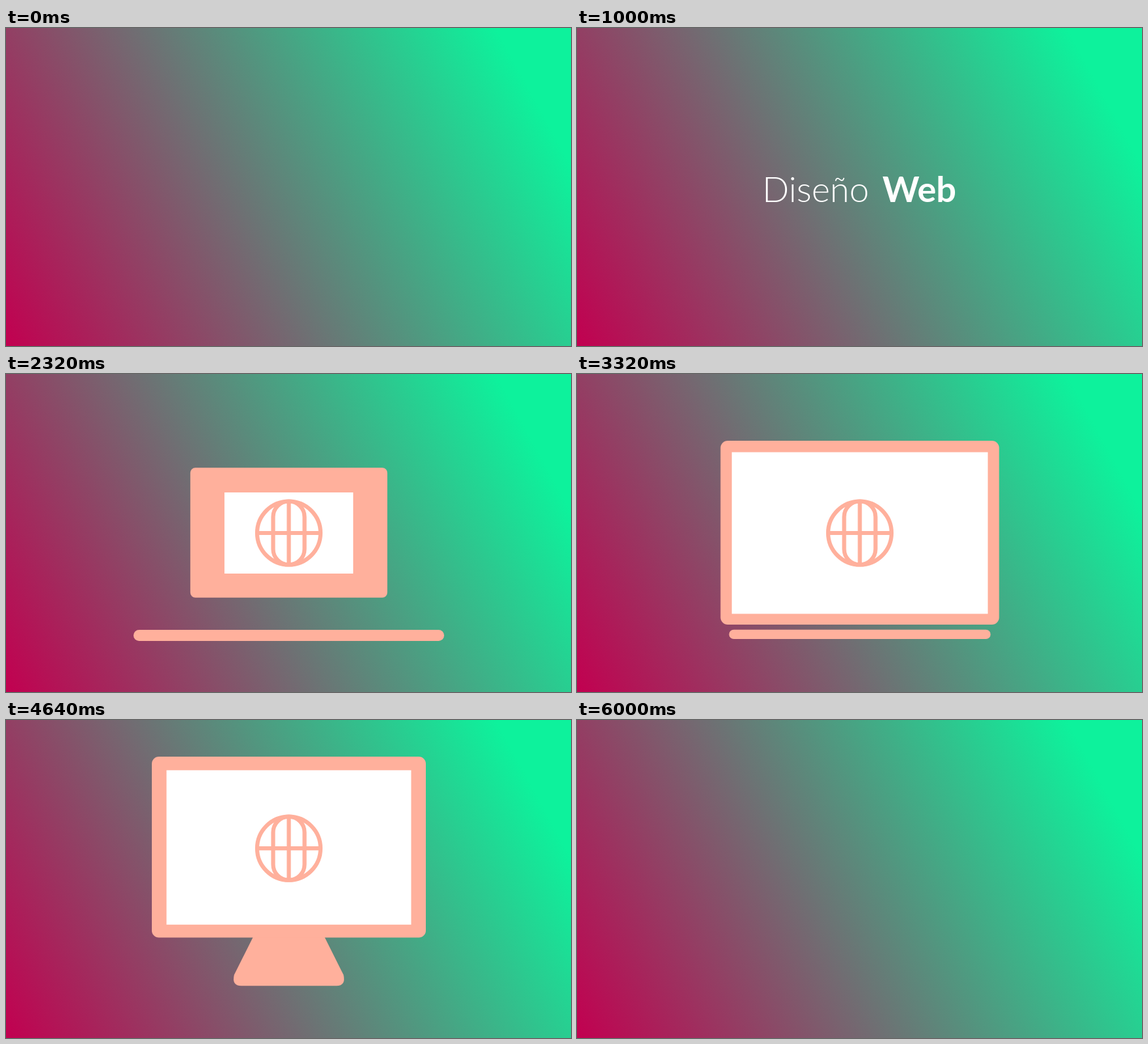
An HTML page with a canvas that plays this animation: 864x486 px, repeating every 6040 ms.

```html
<!DOCTYPE html>
<html lang="es">
<head>
<meta charset="utf-8">
<title>Diseño Web</title>
<style>
  html, body { margin: 0; width: 100%; height: 100%; overflow: hidden; }
  canvas { display: block; }
</style>
</head>
<body>
<canvas id="stage" width="864" height="486"></canvas>
<script>
const LOOP = 6040, PINK = '#ffb09c', CX = 432.5, CY = 243;
const ctx = document.getElementById('stage').getContext('2d');

const ramp = (t, a, b) => Math.min(1, Math.max(0, (t - a) / (b - a)));
const ease = (t, a, b) => { const u = ramp(t, a, b); return u * u * (3 - 2 * u); };

function gradient(x0, y0, x1, y1, from, to) {
  const g = ctx.createLinearGradient(x0, y0, x1, y1);
  g.addColorStop(0, from);
  g.addColorStop(1, to);
  return g;
}
const backdrop = gradient(0, 486, 782, 59, '#c20050', '#0df29c');
const textFill = gradient(0, 302, 0, 313, '#fff', 'rgba(255,255,255,0)');

// Globe strokes around the origin: path, length, draw-in end, erase end, cap
const globe = [
  ['M0-48.5A48.5 48.5 0 0 1 0 48.5A48.5 48.5 0 0 1 0-48.5', 97 * Math.PI, 1920, 5960, 'round'],
  ['M-48.5 0H48.5', 97, 1880, 5700, 'butt'],
  ['M0-48.5V48.5', 97, 1880, 5700, 'butt'],
  ['M0-48.5A24 24 0 0 0-24-24.5V24.5A24 24 0 0 0 0 48.5', 124.4, 1930, 5740, 'butt'],
  ['M0-48.5A24 24 0 0 1 24-24.5V24.5A24 24 0 0 1 0 48.5', 124.4, 1930, 5740, 'butt']
].map(([d, ...rest]) => [new Path2D(d), ...rest]);

const stand = new Path2D(
  'M-36 100H36L85 198Q89 215 74 215H-74Q-89 215-85 198Z');

function box(x, y, w, h, r, color) {
  if (w <= 0 || h <= 0) return;
  ctx.fillStyle = color;
  ctx.beginPath();
  ctx.roundRect(x - w / 2, y - h / 2, w, h, r);
  ctx.fill();
}

function word(text, x, weight, t, start) {
  const rise = 95 * (1 - ramp(t, start, start + 340)) ** 3;
  const sink = 95 * ramp(t, 940, 1280) ** 3;
  ctx.font = `${weight} 54px Raleway, Lato, sans-serif`;
  ctx.textAlign = 'center';
  ctx.fillStyle = textFill;
  ctx.fillText(text, x, 265 + rise + sink);
}

function drawBar(t) {
  const shrink = ease(t, 3160, 3800), s = 1 - shrink;
  const y = 399.5 + 95 * (1 - ease(t, 1880, 2280)) - 10 * shrink;
  box(CX, y, 475 * s, 17 * s, 8.5 * s, PINK);
}

function drawScreen(t, lift) {
  const s = ease(t, 2000, 2500) * (1 - ease(t, 4605, 5080));
  const inner = ease(t, 2040, 2600) * (1 - ease(t, 4577, 5080));
  const y = 242.5 - lift;
  if (t > 3600 && t < 5080) {
    ctx.save();
    ctx.translate(CX, y + 0.5);
    ctx.scale(s, s);
    ctx.translate(0, -76 * (1 - ease(t, 3600, 4280)));
    ctx.fillStyle = PINK;
    ctx.fill(stand);
    ctx.restore();
  }
  box(CX, y, 426 * s, 281 * s, 11 * s, PINK);
  box(CX, y + 0.5, 391.5 * inner, 247 * inner, 0, '#fff');
}

function drawGlobe(t, lift) {
  ctx.save();
  ctx.translate(CX, CY - lift);
  ctx.strokeStyle = PINK;
  ctx.lineWidth = 6.2;
  for (const [path, length, drawn, erased, cap] of globe) {
    const from = ramp(t, 5160, erased), to = ramp(t, 1320, drawn);
    if (to <= from) continue;
    ctx.lineCap = cap;
    ctx.setLineDash([(to - from) * length, 2 * length]);
    ctx.lineDashOffset = -from * length;
    ctx.stroke(path);
  }
  ctx.restore();
}

function draw(t) {
  ctx.fillStyle = backdrop;
  ctx.fillRect(0, 0, 864, 486);
  if (t < 1290) {
    word('Diseño', 365, 300, t, 40);
    word('Web', 523.5, 700, t, 365);
  }
  const up = ease(t, 3320, 3840);
  drawBar(t);
  drawScreen(t, 49 * up * (1 - ease(t, 4605, 5080)));
  drawGlobe(t, 49 * up * (1 - ease(t, 4577, 5080)));
}

const begin = performance.now();
function tick() {
  draw((performance.now() - begin) % LOOP);
  requestAnimationFrame(tick);
}
tick();
</script>
</body>
</html>
```
